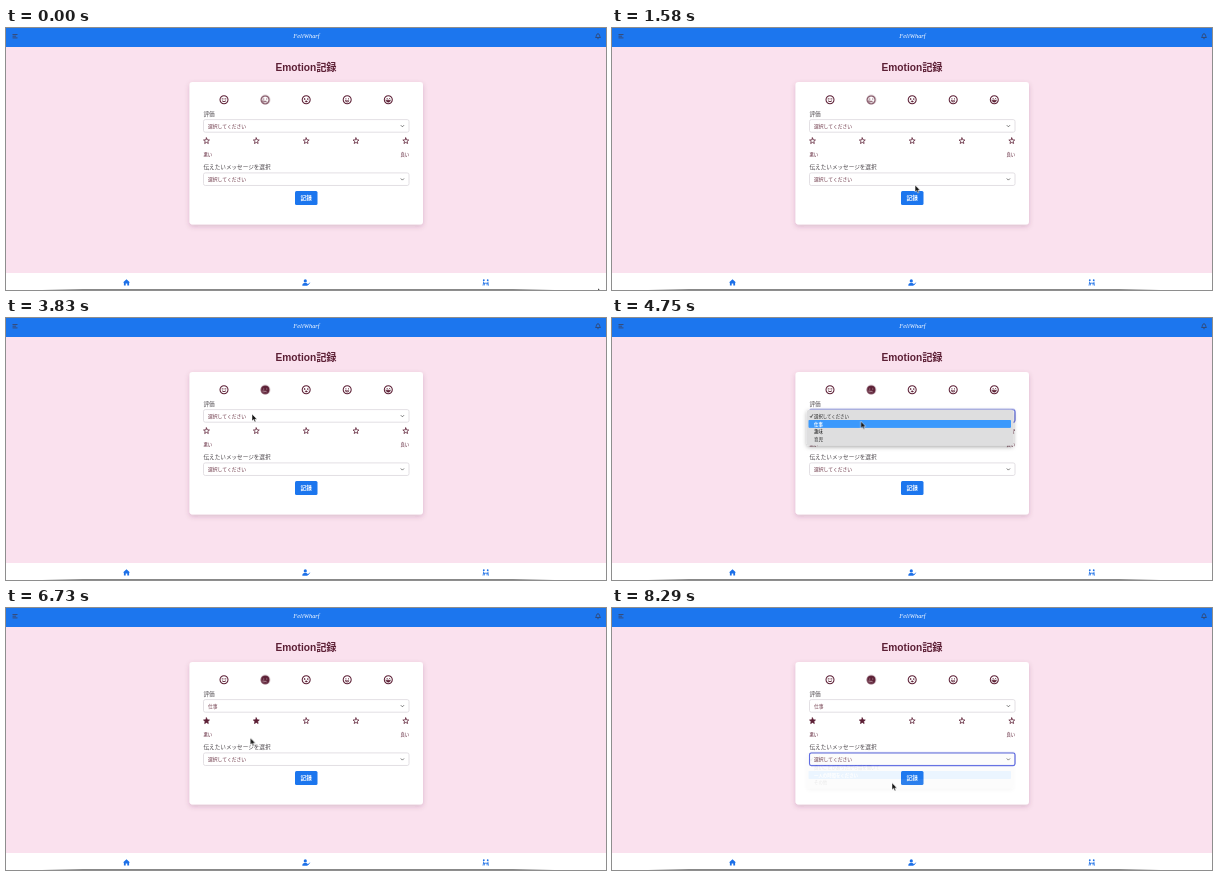
These frames come from a looping animation (600x262 px, 8.31 s). An HTML page:

```html
<!DOCTYPE html>
<html lang="ja">
<head>
<meta charset="utf-8">
<title>Emotion記録</title>
<style>
html, body { margin: 0; width: 100%; height: 100%; overflow: hidden; background: #fae1ee; }
svg { display: block; width: 600px; height: 262px; }
text { font-family: "Liberation Sans", "Noto Sans CJK JP", "Noto Sans CJK", sans-serif; }
.value { font-size: 4.8px; fill: #6b3445; font-weight: 500; }
.label { font-size: 5.6px; fill: #494449; font-weight: 500; }
.small { font-size: 4.3px; fill: #5c1f35; font-weight: 500; }
.item { font-size: 4.4px; fill: #222; font-weight: 500; }
.on .item { fill: #fff; font-weight: 700; }
.on rect { fill: #3b99fc; }
.line { fill: none; stroke: #5c1f35; stroke-linecap: round; stroke-linejoin: round; }
.ring { fill: none; stroke: #5362e4; stroke-width: 1.1; }

/* Hard switches and the pointer share one loop */
.t { animation: 8.31s step-end infinite; }
.face { animation-name: face; }
.face-off { animation-name: face-off; }
.ring1 { animation-name: ring1; }
.ring2 { animation-name: ring2; }
.chosen { animation-name: chosen; }
.empty { animation-name: empty; }
.rated { animation-name: rated; }
.menu1 { animation-name: menu1; }
.menu2 { animation-name: menu2; }
.a0 { animation-name: a0; }
.a1 { animation-name: a1; }
.b0 { animation-name: b0; }
.b1 { animation-name: b1; }
.b2 { animation-name: b2; }
.arrow { animation-name: arrow; }
.hand { animation-name: hand; }
.cursor { animation: move 8.31s ease-in-out infinite; }

@keyframes face { 0% { opacity: 0 } 36.22%, 100% { opacity: 1 } }
@keyframes face-off { 0% { opacity: 1 } 36.22%, 100% { opacity: 0 } }
@keyframes ring1 { 0% { opacity: 0 } 46.57% { opacity: 1 } 75.8%, 100% { opacity: 0 } }
@keyframes ring2 { 0% { opacity: 0 } 84.8%, 100% { opacity: 1 } }
@keyframes chosen { 0% { opacity: 0 } 65%, 100% { opacity: 1 } }
@keyframes empty { 0% { opacity: 1 } 65%, 100% { opacity: 0 } }
@keyframes rated { 0% { opacity: 0 } 75.8%, 100% { opacity: 1 } }
@keyframes menu1 {
  0% { opacity: 0 }
  46.57% { opacity: 1 }
  64.3% { opacity: 1; animation-timing-function: linear }
  65.6%, 100% { opacity: 0 }
}
@keyframes menu2 {
  0% { opacity: 0 }
  84.8% { opacity: 1 }
  98.7% { opacity: 1; animation-timing-function: linear }
  99.7% { opacity: .1 }
  100% { opacity: 0 }
}
@keyframes a0 { 0% { opacity: 1 } 53%, 100% { opacity: 0 } }
@keyframes a1 { 0% { opacity: 0 } 53%, 100% { opacity: 1 } }
@keyframes b0 { 0% { opacity: 1 } 88%, 100% { opacity: 0 } }
@keyframes b1 { 0% { opacity: 0 } 88% { opacity: 1 } 94.5%, 100% { opacity: 0 } }
@keyframes b2 { 0% { opacity: 0 } 94.5%, 100% { opacity: 1 } }
@keyframes arrow {
  0% { opacity: 1 } 29.8% { opacity: 0 } 38.2% { opacity: 1 }
  71.5% { opacity: 0 } 78.5%, 100% { opacity: 1 }
}
@keyframes hand {
  0% { opacity: 0 } 29.8% { opacity: 1 } 38.2% { opacity: 0 }
  71.5% { opacity: 1 } 78.5%, 100% { opacity: 0 }
}
@keyframes move {
  0%, .36% { transform: translate(592px, 260px) }
  9.27% { transform: translate(258.5px, 92.8px) }
  10.35%, 11.55% { transform: translate(260px, 96px) }
  21.18%, 21.66% { transform: translate(308px, 164px) }
  24.07%, 25.87% { transform: translate(256px, 48px) }
  31.17%, 36.22% { transform: translate(260.5px, 72px) }
  46.09%, 46.57% { transform: translate(246px, 96px) }
  57.16% { transform: translate(248.8px, 103.3px) }
  64.5% { transform: translate(249px, 105px) }
  67.87%, 69.07% { transform: translate(255.6px, 109.6px) }
  73.41%, 77.98% { transform: translate(250px, 112px) }
  84.24%, 84.8% { transform: translate(238px, 150px) }
  89.65%, 90.13% { transform: translate(238.3px, 157.8px) }
  98.32% { transform: translate(270px, 167px) }
  99.76%, 100% { transform: translate(280px, 174.8px) }
}
</style>
</head>
<body>
<svg viewBox="0 0 600 262">
  <defs>
    <filter id="soft" x="-10%" y="-15%" width="120%" height="135%">
      <feDropShadow dx="0" dy="2" stdDeviation="2.5" flood-color="#5c1f45" flood-opacity=".2"/>
    </filter>
    <filter id="lift" x="-10%" y="-30%" width="120%" height="175%">
      <feDropShadow dx="0" dy="1.5" stdDeviation="2" flood-opacity=".35"/>
    </filter>
    <radialGradient id="glow">
      <stop offset=".3" stop-color="#a9d3e4"/>
      <stop offset="1" stop-color="#a9d3e4" stop-opacity="0"/>
    </radialGradient>
    <linearGradient id="dock">
      <stop offset="0" stop-color="#888" stop-opacity="0"/>
      <stop offset=".08" stop-color="#888"/>
      <stop offset=".92" stop-color="#888"/>
      <stop offset="1" stop-color="#888" stop-opacity="0"/>
    </linearGradient>
    <path id="star" d="M0-3.1 .82-1.13 2.95-.96 1.33.43 1.82 2.51 0 1.4-1.82 2.51-1.33.43-2.95-.96-.82-1.13Z"/>
    <g id="box">
      <rect x="197.5" width="205.5" height="12.6" rx="1.8" fill="#fff" stroke="#dcd9dd" stroke-width=".8"/>
      <path d="M394.8 5.6l1.6 1.6 1.6-1.6" fill="none" stroke="#555" stroke-width=".8"/>
    </g>
    <rect id="focus" class="ring" x="197.5" width="205.5" height="12.6" rx="1.8"/>
    <rect id="panel" x="194.8" width="206.6" height="35.8" rx="2.5" fill="#dededf" filter="url(#lift)"/>
    <rect id="bar" x="196.5" y="-4" width="202.5" height="8" rx=".8"/>
    <path id="check" d="M198 .1l1 1.4 1.9-3.2" fill="none" stroke-width=".7"/>
  </defs>

  <rect width="600" height="262" fill="#fae1ee"/>
  <rect width="600" height="19" fill="#1c76ee"/>
  <path d="M6.5 6.5h5M6.5 8.2h3.6M6.5 9.9h5" stroke="#3b4260" stroke-width=".8"/>
  <path d="M589.6 9.5c1-1 .6-3.8 2.4-3.8s1.4 2.800 2.400 3.800ZM591.300 10.700h1.400" fill="none" stroke="#344264" stroke-width=".8"/>
  <text x="300.500" y="10.300" text-anchor="middle" fill="#fff" style="font:italic 6.4px 'Liberation Serif',serif">FeliWharf</text>

  <text x="300" y="43.200" text-anchor="middle" font-size="10.200" font-weight="700" fill="#5c1f35">Emotion記録</text>
  <rect x="183.500" y="54" width="233.500" height="142.500" rx="3" fill="#fff" filter="url(#soft)"/>

  <!-- faces -->
  <g class="line" stroke-width="1.050">
    <g transform="translate(218 71.800)">
      <circle r="4"/><path d="M-1.900-.9h1M.9-.9h1M-1.700 1.300q1.700 1.500 3.400 0" stroke-width=".9"/>
    </g>
    <g transform="translate(259.200 71.800)">
      <g class="t face-off">
        <circle r="4"/><path d="M-1.500-1v.2M1.500-1v.2M-1.200 1.800q1.300-1 2.500 0M-2 .8v1" stroke-width=".9"/>
      </g>
      <g class="t face" opacity="0">
        <circle r="4" fill="#5c1f35"/>
        <path d="M-1.500-1v.2M1.500-1v.2M-1.200 1.800q1.300-1 2.500 0M-2 .8v1" stroke="#d9bfc8" stroke-width=".8"/>
      </g>
    </g>
    <g transform="translate(300.200 71.800)">
      <circle r="4"/><path d="M-2-1.500l1.100.8-1.100.6M2-1.500l-1.100.8 1.100.6" stroke-width=".8"/>
      <ellipse cy="1.600" rx=".9" ry=".7" fill="#5c1f35" stroke-width=".5"/>
    </g>
    <g transform="translate(341.200 71.800)">
      <circle r="4"/><path d="M-1.300-1.200v.5M1.300-1.200v.5M-1.700 1h3.400q-.3 1.200-1.700 1.200t-1.700-1.200" stroke-width=".8"/>
    </g>
    <g transform="translate(382.300 71.800)">
      <circle r="4"/><path d="M-1.900-.8l.6-.6.6.6M.7-.8l.6-.6.6.6" stroke-width=".8"/>
      <path d="M-2.200.5h4.400q-.4 2-2.200 2t-2.200-2Z" fill="#5c1f35" stroke-width=".5"/>
    </g>
  </g>

  <text class="label" x="197.500" y="87.600">評価</text>
  <use href="#box" y="91.600"/>
  <text class="value t empty" x="202" y="99.700">選択してください</text>
  <text class="value t chosen" x="202" y="99.700" opacity="0">仕事</text>
  <use href="#focus" y="91.600" class="t ring1" opacity="0"/>

  <g class="line" stroke-width=".8">
    <use href="#star" x="200.500" y="113"/>
    <use href="#star" x="250.300" y="113"/>
    <use href="#star" x="300.200" y="113"/>
    <use href="#star" x="350" y="113"/>
    <use href="#star" x="399.800" y="113"/>
  </g>
  <g class="t rated" fill="#5c1f35" opacity="0">
    <use href="#star" x="200.500" y="113"/>
    <use href="#star" x="250.300" y="113"/>
  </g>
  <text class="small" x="197.500" y="127.800">悪い</text>
  <text class="small" x="403" y="127.800" text-anchor="end">良い</text>

  <text class="label" x="197.500" y="141">伝えたいメッセージを選択</text>
  <use href="#box" y="144.900"/>
  <text class="value" x="202" y="153">選択してください</text>
  <use href="#focus" y="144.900" class="t ring2" opacity="0"/>
  <rect x="289" y="163" width="22.500" height="14" rx="1.500" fill="#1c76ee"/>
  <text x="300.200" y="172.100" text-anchor="middle" font-size="5.600" font-weight="700" fill="#fff">記録</text>

  <!-- open lists -->
  <g class="t menu1" opacity="0">
    <use href="#panel" y="91.800"/>
    <g transform="translate(0 98)">
      <use href="#check" stroke="#222"/>
      <text class="item" x="202" y="1.600">選択してください</text>
      <text class="item" x="202" y="9.500">仕事</text>
      <text class="item" x="202" y="17.400">趣味</text>
      <text class="item" x="202" y="25.300">育児</text>
      <g class="on t a0">
        <use href="#bar" fill="#3b99fc"/><use href="#check" stroke="#fff"/>
        <text class="item" x="202" y="1.600">選択してください</text>
      </g>
      <g class="on t a1" transform="translate(0 7.900)">
        <use href="#bar" fill="#3b99fc"/><text class="item" x="202" y="1.600">仕事</text>
      </g>
    </g>
  </g>
  <g class="t menu2" opacity="0">
    <use href="#panel" y="145"/>
    <ellipse cx="300.500" cy="171.500" rx="15" ry="9.500" fill="url(#glow)"/>
    <g transform="translate(0 151.200)">
      <use href="#check" stroke="#222"/>
      <text class="item" x="202" y="1.600">選択してください</text>
      <text class="item" x="202" y="9.500">良いことがあったから話を聞いて</text>
      <text class="item" x="202" y="17.400">一人の時間をください</text>
      <text class="item" x="202" y="25.300">その他</text>
      <g class="on t b0">
        <use href="#bar" fill="#3b99fc"/><use href="#check" stroke="#fff"/>
        <text class="item" x="202" y="1.600">選択してください</text>
      </g>
      <g class="on t b1" transform="translate(0 7.900)">
        <use href="#bar" fill="#3b99fc"/><text class="item" x="202" y="1.600">良いことがあったから話を聞いて</text>
      </g>
      <g class="on t b2" transform="translate(0 15.800)">
        <use href="#bar" fill="#3b99fc"/><text class="item" x="202" y="1.600">一人の時間をください</text>
      </g>
    </g>
  </g>

  <!-- footer -->
  <rect y="245" width="600" height="17" fill="#fff"/>
  <rect x="36" y="261" width="512" height="1" fill="url(#dock)"/>
  <g fill="#1c70e8">
    <path d="M120.500 251.200l3.500 3.200h-.9v3.200h-1.800v-2h-1.600v2h-1.800v-3.200h-.9Z"/>
    <circle cx="299.300" cy="252.900" r="1.600"/>
    <path d="M296.300 257.700q0-2.700 2.200-2.700h1.600q1 0 1.600 1l-.6.700.8 1Z"/>
    <path d="M301 256l1 1 1.700-2.300" fill="none" stroke="#1c70e8" stroke-width=".9"/>
    <circle cx="477.800" cy="252.200" r=".9"/><circle cx="481.700" cy="252.200" r=".9"/>
    <path d="M477.500 253.600v1.600h4.500v-1.600M477.500 255l-.5 2.600M482 255l.5 2.600M478.400 255v2.400M481.100 255v2.400" fill="none" stroke="#1c70e8" stroke-width=".8"/>
  </g>

  <g class="cursor">
    <path class="t arrow" d="M0 0v7l1.600-1.400 1.100 2.400 1.200-.5-1.100-2.300h2.200Z" fill="#111" stroke="#fff" stroke-width=".5"/>
    <path class="t hand" opacity="0" d="M-.7.600q.7-1.200 1.400 0v2.300l2.800.6q.9.300.8 1.300l-.5 2.800h-3.600l-2.300-3.200q.3-1 1.400-.1Z" fill="#111" stroke="#fff" stroke-width=".5"/>
  </g>
</svg>
</body>
</html>
```
